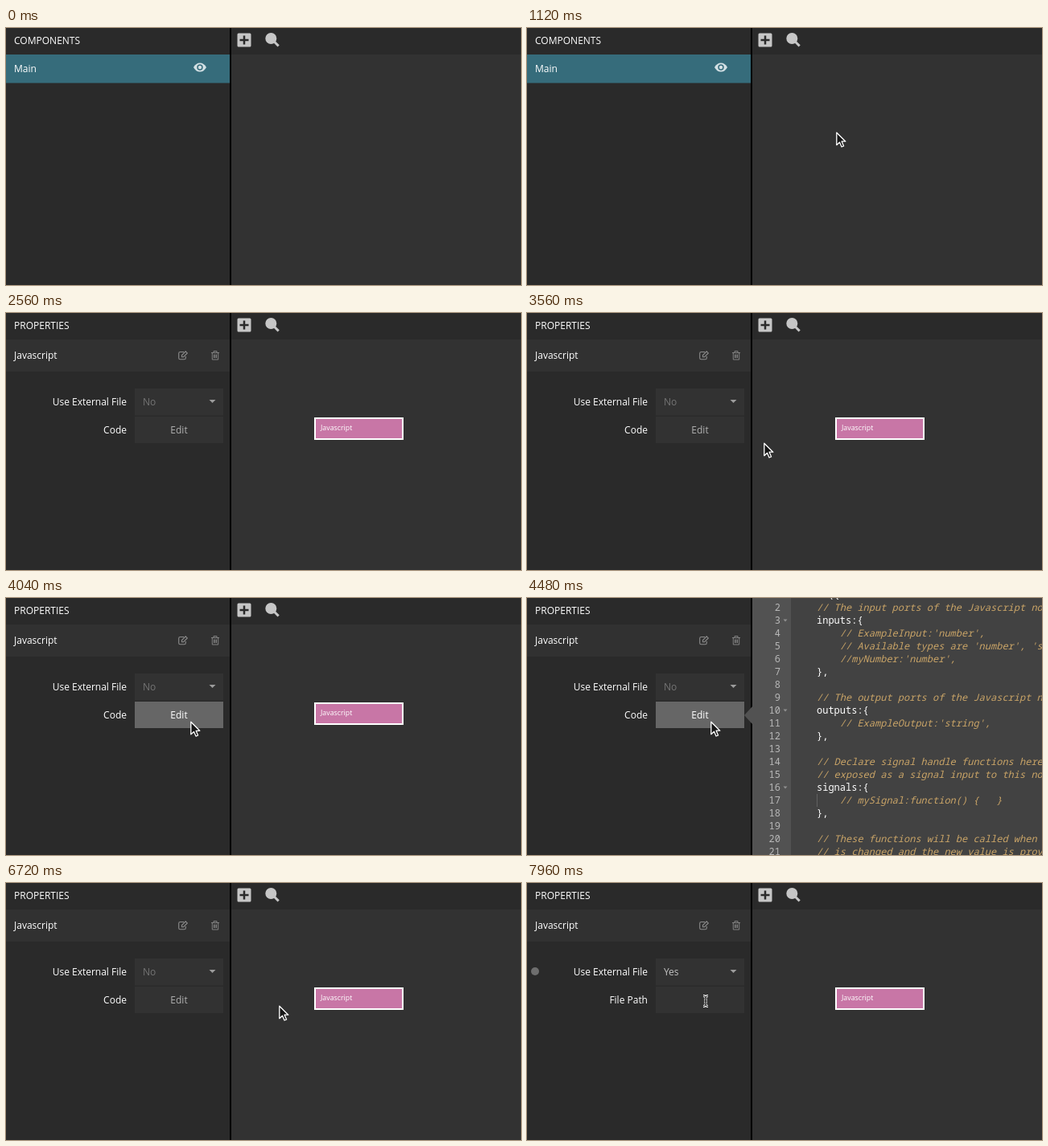
An HTML page that plays this animation: 640x320 px, repeating every 8 s.

```html
<!DOCTYPE html>
<html lang="en">
<head>
<meta charset="utf-8">
<title>Component editor</title>
<style>
  html, body { margin: 0; width: 100%; height: 100%; overflow: hidden; background: #2a2a2a; }
  svg { display: block; width: 640px; height: 320px; }
  text { font: 12px "Open Sans", "Noto Sans", sans-serif; fill: #fff; white-space: pre; }
  .end { text-anchor: end; }
  .mid { text-anchor: middle; }
  .small { font-size: 8.8px; }
  #editor text { font: 12px "Noto Sans Mono", "DejaVu Sans Mono", monospace; }
  #editor .num { fill: #b8b8b8; text-anchor: end; }
  #editor .note { fill: #c9a467; font-style: italic; }
</style>
</head>
<body>
<svg viewBox="0 0 640 320">
  <rect width="640" height="320" fill="#2a2a2a"/>
  <rect x="280" y="33" width="360" height="287" fill="#323232"/>

  <g id="toolbar" fill="#c6c6c6">
    <rect x="287.500" y="6.500" width="17" height="17" rx="1.500"/>
    <path d="M296 9.500V20.500M290.500 15H301.500" stroke="#2a2a2a" stroke-width="2.500"/>
    <circle cx="329.300" cy="13" r="7"/>
    <path d="M333 16.700L338.700 22.400" stroke="#c6c6c6" stroke-width="3"/>
  </g>

  <g id="components">
    <text x="10" y="20">COMPONENTS</text>
    <rect y="33" width="278" height="35.500" fill="#366c7b"/>
    <text x="10" y="55">Main</text>
    <g transform="translate(241 49)">
      <path d="M-8 0Q-5 -5.500 0 -5.500T8 0Q5 5.500 0 5.500T-8 0Z" fill="#d3e0e4"/>
      <circle r="3.700" fill="#366c7b"/>
      <circle r="2.200" fill="#d3e0e4"/>
    </g>
  </g>

  <g id="properties">
    <text x="10" y="20">PROPERTIES</text>
    <rect y="33" width="278" height="40" fill="#313131"/>
    <text x="10" y="57">Javascript</text>
    <g fill="none" stroke="#8c8c8c" stroke-width="1.100">
      <path d="M221 48.500H216.500Q214.700 48.500 214.700 50.300V56Q214.700 57.800 216.500 57.800H221.500Q223.300 57.800 223.300 56V54"/>
      <path d="M218.500 54.700V52.500L223.200 47.800L225.300 49.900L220.600 54.700Z"/>
      <path d="M255 49.500H265M258 49V47.500H262V49M256.300 49.500V58H263.700V49.500M258.500 51.500V56M260 51.500V56M261.500 51.500V56" stroke-width=".9"/>
    </g>
    <circle id="dot" cx="10" cy="110" r="5" fill="#6e6e6e"/>
    <text x="150" y="115" class="end">Use External File</text>
    <rect x="160" y="94" width="110" height="33.500" fill="#323232"/>
    <text id="choice" x="170" y="115"></text>
    <path d="M252.500 108H260.500L256.500 112Z" fill="#9c9c9c"/>
    <text id="field" x="150" y="150" class="end"></text>
    <rect id="button" x="160" y="129" width="110" height="33"/>
    <text id="edit" x="215" y="150" class="mid">Edit</text>
    <g id="options">
      <rect x="160" y="128" width="110" height="62" fill="#3e3e3e"/>
      <rect id="picked" x="160" y="128" width="110" height="31" fill="#666"/>
      <text x="170" y="149">Yes</text>
      <text x="170" y="180">No</text>
    </g>
  </g>

  <rect x="278" width="2" height="320" fill="#000"/>

  <g id="node">
    <rect x="384" y="131" width="109" height="26" fill="#c876a6" stroke="#fff" stroke-width="2"/>
    <text x="391" y="146.300" class="small">Javascript</text>
  </g>

  <g id="picker">
    <path d="M234 140H374L384 130L394 140H534V320H234Z" fill="#444"/>
    <rect x="244" y="150" width="280" height="32" fill="#323232"/>
    <text id="query" x="254" y="170"></text>
    <rect id="match" x="234" y="192" width="300" height="32" fill="#666"/>
    <text id="result" x="254" y="212">Javascript</text>
  </g>

  <g id="editor">
    <rect x="280" width="360" height="320" fill="#424242"/>
    <path d="M280 0H328V320H280V157L270 146L280 135Z" fill="#525252"/>
    <path d="M360.500 244V260" stroke="#606060"/>
  </g>

  <g id="arrow"><path d="M.5 .5V16L4.200 12.600L6.700 18.300L9.300 17.200L6.800 11.500H11.500Z" fill="#161616" stroke="#fff" stroke-width="1.300" stroke-linejoin="round"/></g>
  <g id="beam" fill="none">
    <path id="stem" d="M219 140.500Q222 140.500 222 143V151Q222 153.500 219 153.500M225 140.500Q222 140.500 222 143V151Q222 153.500 225 153.500M220 147H224" stroke="#fff" stroke-width="2.800"/>
    <use href="#stem" style="display:none"/>
    <path d="M219 140.500Q222 140.500 222 143V151Q222 153.500 219 153.500M225 140.500Q222 140.500 222 143V151Q222 153.500 225 153.500M220 147H224" stroke="#222"/>
  </g>
</svg>
<script>
const LOOP = 8000, STEP = 40;
const $ = id => document.getElementById(id);
const show = (id, on) => { $(id).style.display = on ? "" : "none"; };
const within = (t, a, b) => t >= a && t < b;

const code = `define({
    // The input ports of the Javascript node, and their types
    inputs:{
        // ExampleInput:'number',
        // Available types are 'number', 'string', 'boolean'
        //myNumber:'number',
    },

    // The output ports of the Javascript node
    outputs:{
        // ExampleOutput:'string',
    },

    // Declare signal handle functions here, each is
    // exposed as a signal input to this node
    signals:{
        // mySignal:function() {   }
    },

    // These functions will be called when an input
    // is changed and the new value is provided`.split("\n");

function add(tag, attrs, str = "") {
  const el = document.createElementNS("http://www.w3.org/2000/svg", tag);
  for (const key in attrs) el.setAttribute(key, attrs[key]);
  el.textContent = str;
  $("editor").append(el);
}

code.forEach((line, i) => {
  const y = i * 16, indent = line.search(/\S|$/);
  add("text", { x: 315, y, class: "num" }, i + 1);
  add("text", {
    x: 331.2 + indent * 7.2, y, class: line.includes("//") ? "note" : ""
  }, line.trim());
  if (line.endsWith("{")) add("path", { d: `M318.5 ${y - 5.5}h5l-2.500 3z`, fill: "#8f8f8f" });
});

// time, x, y of the pointer tip
const path = [
  [240, 18, 47], [480, 407, 265],
  [760, 407, 265], [1080, 385, 130],
  [2840, 392, 119], [3280, 441, 147],
  [3400, 441, 147], [3560, 295, 162], [4200, 229, 154],
  [5240, 229, 154], [5560, 240, 187],
  [6280, 240, 187], [6720, 340, 153], [7080, 232, 105],
  [7160, 232, 105], [7560, 222, 147]
];
const ease = {
  3400: k => k * k * (2 - k),
  3560: k => 1 - (1 - k) ** 3
};
const smooth = k => k * k * (3 - 2 * k);

function pointer(t) {
  let i = 0;
  while (i < path.length - 1 && path[i + 1][0] <= t) i++;
  const a = path[i], b = path[i + 1];
  if (!b || t <= a[0]) return [a[1], a[2]];
  const k = (ease[a[0]] || smooth)((t - a[0]) / (b[0] - a[0]));
  return [a[1] + (b[1] - a[1]) * k, a[2] + (b[2] - a[2]) * k];
}

function draw(t) {
  const made = t >= 2560, external = t >= 7840;
  const editing = within(t, 4480, 5600);
  const [x, y] = pointer(t);

  show("components", !made);
  show("properties", made);
  show("node", made);
  show("picker", within(t, 1240, 2560));
  show("match", t >= 1960);
  show("result", t >= 1720);
  $("query").textContent = t < 1720 ? "" : t < 1760 ? "j" : "java";

  const hover = editing ||
    (within(t, 3560, 5600) && x >= 160 && x <= 270 && y >= 129 && y <= 162);
  $("button").setAttribute("fill", hover ? "#666" : "#323232");
  $("edit").style.fill = hover ? "#fff" : "#b0b0b0";
  show("edit", !external);
  show("dot", external);
  $("choice").textContent = external ? "Yes" : "No";
  $("choice").style.fill = external ? "#c4c4c4" : "#757575";
  $("field").textContent = external ? "File Path" : "Code";
  show("options", within(t, 7160, 7840));
  show("picked", y >= 128);
  show("editor", editing);

  show("arrow", within(t, 280, 1720) || within(t, 2880, 7840));
  $("arrow").setAttribute("transform", `translate(${(x - 0.7).toFixed(1)} ${(y - 0.3).toFixed(1)})`);
  show("beam", external);
}

const start = performance.now();
function tick() {
  const t = (performance.now() - start) % LOOP;
  draw(Math.floor(t / STEP) * STEP);
  requestAnimationFrame(tick);
}
tick();
</script>
</body>
</html>
```
